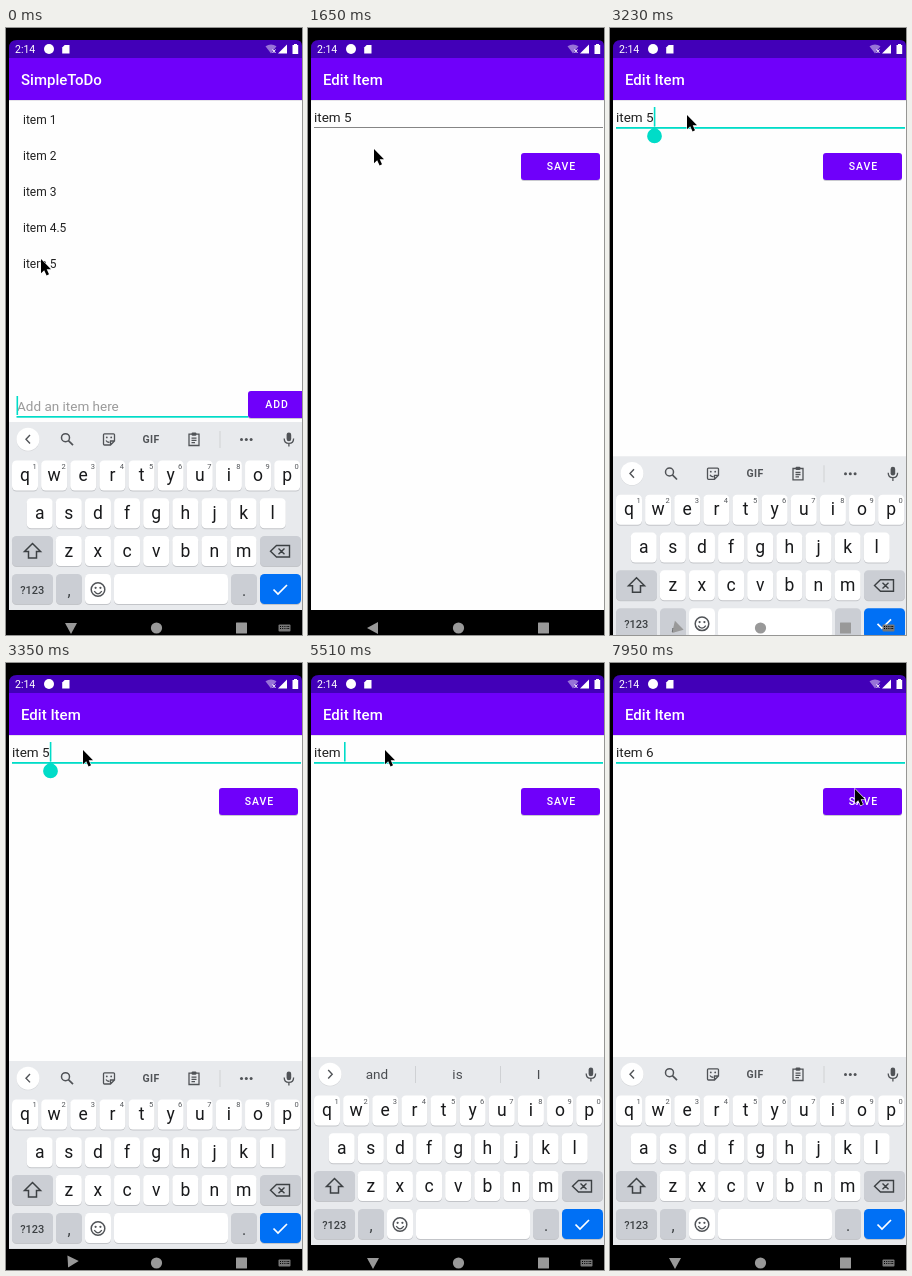
Write an HTML page that moves like this. It is 296x607 px and loops after 8000 ms.

```html
<!DOCTYPE html>
<html lang="en">
<head>
<meta charset="utf-8">
<title>To-do list demo</title>
<style>
  html, body { margin: 0; width: 100%; height: 100%; overflow: hidden; background: #000; }
  svg { display: block; width: 100%; height: 100%; font-family: Roboto, "Noto Sans", sans-serif; }
  text { white-space: pre; }
</style>
</head>
<body>
<svg id="stage" viewBox="0 0 296 607"></svg>
<script>
const LOOP = 8000, FPS = 17;
const PURPLE = '#6f00fa', DARK = '#4200b8', TEAL = '#00dcc8', INK = '#222', ICON = '#505357';

// ---- markup helpers ----
const rect = (x, y, w, h, fill, rx = 0, extra = '') =>
  `<rect x="${x}" y="${y}" width="${w}" height="${h}" fill="${fill}" rx="${rx}" ${extra}/>`;
const text = (x, y, size, str, fill = INK, extra = '') =>
  `<text x="${x}" y="${y}" font-size="${size}" fill="${fill}" ${extra}>${str}</text>`;
const mid = (x, y, size, str, fill = INK, extra = '') =>
  text(x, y, size, str, fill, `text-anchor="middle" ${extra}`);
const line = (d, stroke = ICON, w = 1.4, fill = 'none') =>
  `<path d="${d}" stroke="${stroke}" stroke-width="${w}" fill="${fill}"/>`;
const dot = (x, y, r, fill, extra = '') => `<circle cx="${x}" cy="${y}" r="${r}" fill="${fill}" ${extra}/>`;
const group = (id, body, extra = '') => `<g id="${id}" ${extra}>${body}</g>`;

const button = (x, y, w, label, cx) =>
  rect(x, y + 1, w, 27, '#c9c9cf', 3) + rect(x, y, w, 27, PURPLE, 3) +
  mid(cx, y + 17.3, 10.5, label, '#fff', 'font-weight="500" letter-spacing=".94"');

// App window: status strip, app bar, page and the strip under the navigation buttons
const appWindow = (id, title, body) => group(id,
  rect(3, 12, 294, 630, '#000') + rect(3, 12, 294, 18, DARK) +
  rect(3, 72, 294, 510, '#fefefe') + rect(3, 72, 294, 1, '#e6e3ea') +
  rect(3, 30, 294, 42, PURPLE) + text(15, 57, 15, title, '#fff', 'font-weight="500"') + body);

function listWindow() {
  const items = ['1', '2', '3', '4.5', '5']
    .map((n, i) => text(17, 95.5 + 36 * i, 12, 'item ' + n)).join('');
  const entry = text(11, 382.7, 13.5, 'Add an item here', '#9b9b9b') +
    rect(10.5, 388, 232, 1.7, TEAL) + button(242, 363, 58, 'ADD', 271) +
    rect(10.5, 368, 1.6, 19, TEAL, 0, 'id="listCaret"');
  return appWindow('list', 'SimpleToDo', items + group('entry', entry));
}

function editWindow() {
  const handle = `<path d="M44.5 98.5L50 103A7.4 7.4 0 1 1 39 103Z" fill="${TEAL}"/>`;
  return appWindow('edit', 'Edit Item',
    text(6, 94, 13.5, 'item 5', INK, 'id="field"') +
    rect(6, 99, 289, 1, '#858585', 0, 'id="underline"') +
    button(213, 125, 79, 'SAVE', 253.4) +
    rect(0, 79, 1.6, 19.5, TEAL, 0, 'id="caret"') + group('handle', handle));
}

// ---- keyboard ----
const KEY = '#fff', SPECIAL = '#cbced4', PITCH = 29.13;
const key = (x, y, w, fill = KEY) =>
  rect(x, y + 1, w, 30, '#c3c5c9', 4.5) + rect(x, y, w, 30, fill, 4.5);
const letters = (str, x0, y) => [...str].map((c, i) => {
  const cx = x0 + i * PITCH;
  return key(cx - 13, y, 26) + mid(cx, y + 20.7, 17.5, c, '#18191b');
}).join('');

function keyboard() {
  const digits = [...'1234567890'].map((d, i) => mid(28.5 + i * PITCH, 440.5, 7.5, d, '#55585c')).join('');
  const rows = letters('qwertyuiop', 19, 432.5) + digits +
    letters('asdfghjkl', 33.7, 470.3) +
    key(6, 508, 41, SPECIAL) + letters('zxcvbnm', 62.8, 508) + key(254, 508, 41, SPECIAL) +
    key(6, 546, 41, SPECIAL) + key(50, 546, 26, SPECIAL) + key(79, 546, 26) +
    key(108, 546, 114) + key(225, 546, 26, SPECIAL) + key(254, 546, 41, '#0070f5');
  const glyphs =
    line('M26.5 515.5L34.5 523.5H30.5V530H22.5V523.5H18.5Z', '#3c4043', 1.5) +
    line('M270.5 517.5H283.5V529H270.5L264.5 523.2ZM272.5 520.5L278.5 526.3M278.5 520.5L272.5 526.3', '#3c4043', 1.4) +
    mid(26.3, 566, 11, '?123', '#3c4043', 'font-weight="500"') +
    mid(63, 568, 16, ',', '#3c4043') + mid(238, 568, 16, '.', '#3c4043') +
    dot(92, 561.5, 6.8, 'none', `stroke="${ICON}" stroke-width="1.5"`) +
    dot(89.6, 559.8, 1.1, ICON) + dot(94.4, 559.8, 1.1, ICON) +
    line('M88.2 563.2Q92 568.6 95.8 563.2', ICON, 1.3) +
    line('M267.5 561.5L272 566L281 557', '#fff', 1.7);
  const tools =
    line('M24 407L20 411.2L24 415.4', ICON) +
    dot(59.5, 409.7, 4, 'none', `stroke="${ICON}" stroke-width="1.5"`) + line('M62.4 412.6L67 417.2', ICON, 1.7) +
    line('M98.5 405.8H107.5Q108.5 405.8 108.5 406.8V413L104.5 417H98.5Q97.5 417 97.5 416V406.8Q97.5 405.8 98.5 405.8ZM104.5 417V413H108.5M100 412.5Q101.5 415 103.5 414', ICON, 1.3) +
    dot(100.8, 409.4, .9, ICON) + dot(105.2, 409.4, .9, ICON) +
    mid(145, 415, 10.5, 'GIF', ICON, 'font-weight="700" letter-spacing=".4"') +
    line('M183 406.2H193V417.5H183ZM185.5 410.2H190.5M185.5 412.4H190.5M185.5 414.6H189', ICON, 1.3) +
    rect(185.6, 404.4, 4.8, 3.4, ICON, 1) +
    rect(213.5, 403, 1, 17, '#cfd1d4') +
    [235.5, 240.3, 245.1].map(x => dot(x, 411.5, 1.5, ICON)).join('');
  const words =
    line('M20.2 407L24.2 411.2L20.2 415.4', ICON) +
    [['and', 69], ['is', 149.5], ['I', 230.5]].map(([w, x]) => mid(x, 416.3, 13.5, w, '#4a4d51')).join('') +
    rect(107, 403, 1, 17, '#cfd1d4') + rect(192, 403, 1, 17, '#cfd1d4');
  const mic = rect(280.6, 404.5, 4.6, 8.8, ICON, 2.3) +
    line('M278.2 410.5Q278.2 415.4 282.9 415.4T287.6 410.5M282.9 415.4V418.6', ICON, 1.3);
  return group('keyboard',
    rect(3, 394, 294, 188, '#e8eaed') + rect(3, 582, 294, 30, '#000') +
    dot(22, 411.7, 11.6, '#d5d7da') + dot(22, 411.2, 11.5, '#fff') +
    group('tools', tools) + group('words', words) + mic + rows + glyphs);
}

function statusBar() {
  return text(9, 25, 10.5, '2:14', '#fff') + dot(43, 21, 5, '#fff') +
    '<path d="M58.7 17H63.5V25.6H56.2V19.5Z" fill="#fff"/>' +
    '<path d="M259.5 18.2Q265 14.8 270.5 18.2L265 25.5Z" fill="#fff" opacity=".45"/>' +
    line('M266.5 21.5L269.5 25M269.5 21.5L266.5 25', '#fff', 1) +
    '<path d="M272 25.6L281 16.6V25.6Z" fill="#fff"/>' +
    '<path d="M288 16H291V17H292.2V26H286.5V17H288Z" fill="#fff"/>';
}

function navBar() {
  const hint = rect(272.5, 596.5, 12, 7, '#777', 1) +
    [274, 276.2, 278.4, 280.6, 282.2].map(x => rect(x, 598, 1, 1, '#000') + rect(x, 600, 1, 1, '#000')).join('');
  return '<path id="back" d="M-6 0L5-6V6Z" fill="#999"/>' +
    dot(150.5, 600, 5.6, '#999') + rect(230, 594.5, 11, 11, '#999', .5) + group('imeIcon', hint);
}

const stage = document.getElementById('stage');
stage.innerHTML =
  '<clipPath id="screen"><path d="M3 607V20Q3 12 11 12H290Q296 12 296 18V607Z"/></clipPath>' +
  rect(0, 0, 296, 607, '#000') +
  group('phone', listWindow() + editWindow() + keyboard() + statusBar() + navBar(), 'clip-path="url(#screen)"') +
  '<path id="pointer" d="M0 0V14.2L3.2 11.2L5.6 16.4L8 15.3L5.7 10.3H10Z" fill="#000" stroke="#fff" stroke-width="1.1" paint-order="stroke"/>';

const el = Object.fromEntries([...stage.querySelectorAll('[id]')].map(n => [n.id, n]));

// ---- motion ----
const clamp = v => Math.min(1, Math.max(0, v));
const span = (t, start, length) => clamp((t - start) / length);
const show = (node, on) => node.setAttribute('visibility', on ? 'visible' : 'hidden');
const move = (node, value) => node.setAttribute('transform', value);
const zoom = s => `translate(150 327) scale(${s}) translate(-150 -327)`;

const cubic = ([a, b, c, d], s) => {
  const r = 1 - s;
  return a * r * r * r + 3 * b * r * r * s + 3 * c * r * s * s + d * s * s * s;
};
// Quick start with a very long tail, as two joined cubics
function extraSlow(u) {
  const [xs, ys] = u < 1 / 6
    ? [[0, .05, .1333, 1 / 6], [0, 0, .06, .4]]
    : [[1 / 6, .2083, .25, 1], [.4, .82, 1, 1]];
  let lo = 0, hi = 1;
  for (let i = 0; i < 20; i++) {
    const m = (lo + hi) / 2;
    if (cubic(xs, m) < u) lo = m; else hi = m;
  }
  return cubic(ys, lo);
}

const POINTER = [
  [0, 35, 231], [1294, 35, 231], [1353, 50, 172], [1412, 65, 136], [1588, 65, 136],
  [1647, 66, 121], [1824, 69, 62], [1941, 72, 24], [2059, 73, 11], [2176, 74, 27],
  [2294, 75, 64], [2412, 76, 89], [2471, 76, 88], [2588, 76, 88], [2647, 77, 87],
  [7412, 77, 87], [7529, 100, 92], [7706, 175, 112], [7824, 232, 127], [7882, 246, 128], [7941, 245, 126]
];
function pointerAt(t) {
  const i = POINTER.findIndex(p => p[0] > t + .6);
  if (i < 0) return POINTER.at(-1).slice(1);
  const [a, b] = [POINTER[i - 1], POINTER[i]];
  const u = span(t, a[0], b[0] - a[0]);
  return [1, 2].map(k => a[k] + (b[k] - a[k]) * u);
}

const CARET_OFF = [[3950, 4490], [4970, 5510], [5990, 6470], [7010, 7310], [7810, LOOP]];

function draw(t) {
  const q = Math.min(LOOP / 1000 * FPS - 1, Math.floor((t + 11) * FPS / 1000)) * 1000 / FPS;

  const open = extraSlow(span(q, 748, 400));
  move(el.list, zoom(1 + .05 * open));
  show(el.list, q < 1150);
  move(el.entry, `translate(0 ${q > 760 ? 187 : 0})`);
  show(el.listCaret, q < 1150 && (t < 470 || t >= 760));
  move(el.edit, zoom(.85 + .15 * open));
  el.edit.setAttribute('opacity', span(q, 798, 83));

  const focused = t >= 2880;
  const typed = t < 4490 ? 'item 5' : t < 7310 ? 'item ' : 'item 6';
  el.field.textContent = typed;
  el.underline.setAttribute('fill', focused ? TEAL : '#858585');
  el.underline.setAttribute('height', focused ? 1.8 : 1);
  el.caret.setAttribute('x', typed === 'item ' ? 36 : 43.8);
  show(el.caret, focused && !CARET_OFF.some(([a, b]) => t >= a && t < b));
  show(el.handle, focused && t < 4490);

  const shown = q < 2000 ? 1 - span(q, 750, 120) : 1 - (1 - span(q, 3060, 405)) ** 3;
  move(el.keyboard, `translate(0 ${188 * (1 - shown)})`);
  show(el.keyboard, shown > 0);
  show(el.imeIcon, shown > 0);
  const words = span(q, 4480, 170) * (1 - span(q, 7420, 170));
  el.words.setAttribute('opacity', words);
  el.tools.setAttribute('opacity', 1 - words);

  const turn = q < 2000 ? 1 - span(q, 800, 270) : span(q, 3150, 310);
  const drift = 2 * Math.sin(Math.PI * turn);
  move(el.back, `translate(${65 + drift} ${600 - drift}) rotate(${270 * turn})`);

  move(el.pointer, `translate(${pointerAt(q)})`);
}

const start = performance.now();
function tick() {
  draw((performance.now() - start) % LOOP);
  requestAnimationFrame(tick);
}
tick();
</script>
</body>
</html>
```
